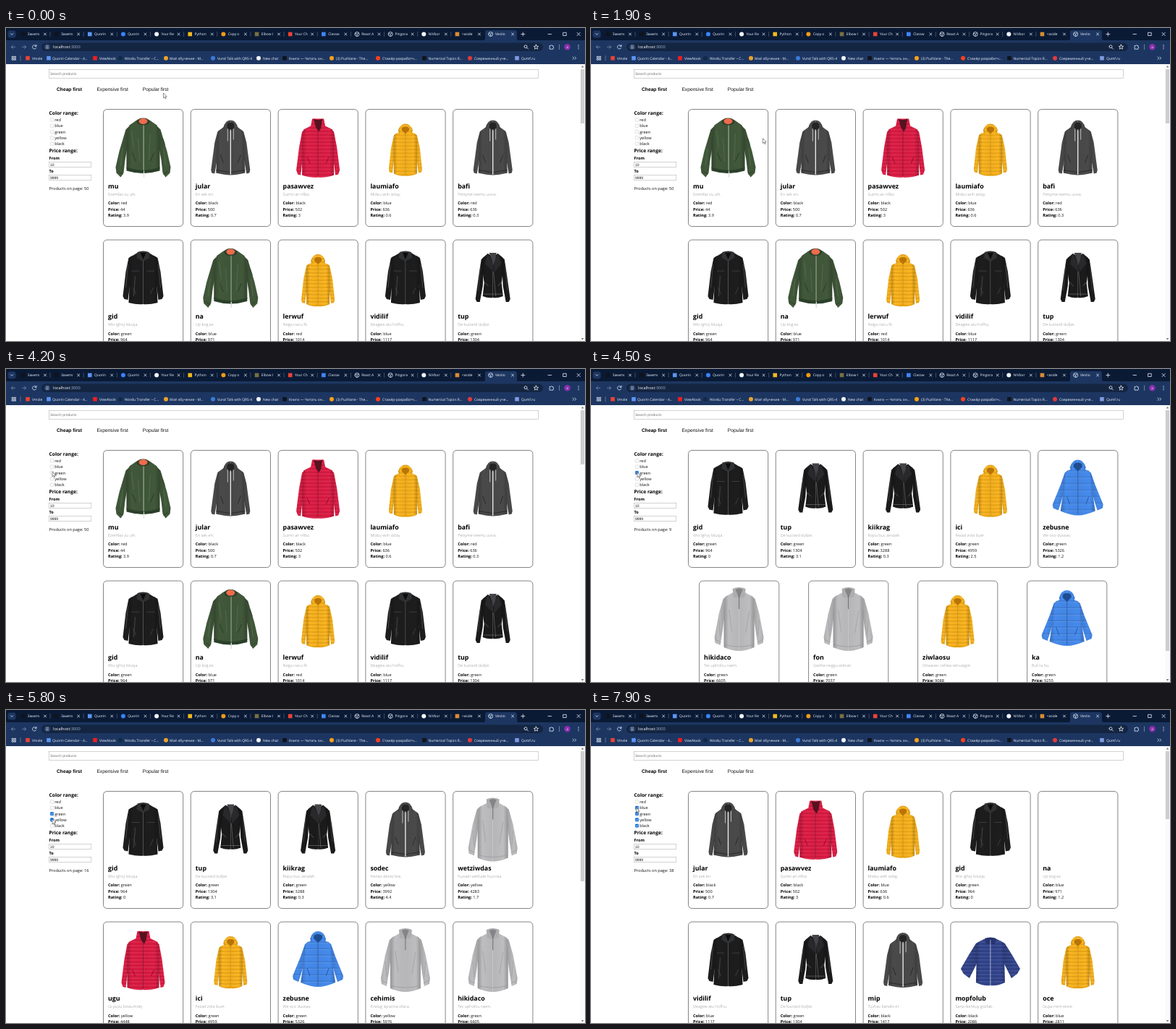
These frames come from a looping animation (800 px wide and 433 px high, 8000 ms). An HTML page:

```html
<!DOCTYPE html>
<html lang="en">
<head>
<meta charset="utf-8">
<title>Jacket shop</title>
<style>
  html, body { margin: 0; width: 100%; height: 100%; overflow: hidden; background: #fff; }
  svg { display: block; width: 100vw; height: 100vh; }
  text { font-family: "Open Sans", "Noto Sans", sans-serif; font-size: 5.6px; fill: #111;
    text-rendering: geometricPrecision; white-space: pre; }
  .b { font-weight: 700; fill: #000; }
  .h { font-size: 6.7px; }
  .name { font-size: 8.8px; }
  .desc { font-weight: 300; fill: #888; }
  .arial { font-family: "Liberation Sans", Arial, sans-serif; }
  .sort { font-size: 6.7px; }
  .field { font-size: 5px; }
  .tab, .mark { font-size: 4.9px; fill: #f4f8ff; font-weight: 500; }
  .ico { fill: none; stroke: #e6eefa; stroke-width: .8; stroke-linecap: round; }
  .box { fill: #fff; stroke: #b4b4b4; stroke-width: .6; }
</style>
</head>
<body>
<svg id="stage" viewBox="0 0 800 433" preserveAspectRatio="none"></svg>
<script>
const LOOP = 8000, STEP = 100;

// Jackets: left half around x = 0, mirrored; y from the card top
const JACKETS = {
  bomber: { c: '#41583a', body: 'M0 15-9 15-19 22-23 40-23 82Q-10 88 0 88Z',
    arm: 'M-17 21-24 28-33 58-38 80-37 88-31 94-27 88-25 70-21 48Z',
    top: `<ellipse cy="17" rx="9" ry="5" fill="#2b402a"/><ellipse cy="16.5" rx="6" ry="4" fill="#ee6b4c"/>
      <path d="M-23 80Q0 88 23 80V85Q0 92-23 85Z" fill="#2b402a"/><path d="M1 22V90" stroke="#8d9b83" stroke-width=".9"/>
      <path d="M1 86V94" stroke="#ddd" stroke-width="1.3"/><path d="M-15 60l5 12M15 60l-5 12M27 40l3 9M-34 86l6 4M34 86l-6 4" stroke="#263b25" stroke-width=".9"/>
      <path d="M-16 30l3 24M-7 40l2 32M10 34l-2 36M-28 54l-3 24M28 54l3 24" stroke="#60775a" opacity=".6"/>` },
  hoodie: { c: '#4a4a4b', body: 'M0 23-9 24-17 30-18 45-20 88Q-8 91 0 91Z',
    arm: 'M-14 28-18 31-22 46-27 84-26 88-22 89-18 66-16 42Z', hood: 'M0 15Q-8 15-10 26L-7 31 0 34Z',
    top: `<path d="M0 18Q-6 18-5 25L0 31 5 25Q6 18 0 18" fill="#242424"/><path d="M0 28V90" stroke="#eee" stroke-width="1.3"/>
      <path d="M-4 27V44M4 27V42" stroke="#ddd" stroke-width=".8"/><path d="M-14 63l4 11M14 63l-4 11M-20 84L-1 87M20 84L1 87" stroke="#222" stroke-width=".8"/>` },
  red: { c: '#e01b44', quilt: 1, body: 'M0 13-8 13-10 23-20 28-22 46-22 91Q-10 95 0 94Z',
    arm: 'M-16 26-22 31-26 52-30 84-28 90-24 91-21 66-19 46Z',
    top: `<path d="M-6 13Q0 16 6 13L4 26 1 31-3 25Z" fill="#54131f"/><path d="M0 30V93" stroke="#8f0c29" stroke-width=".8"/>
      <path d="M-15 66l4 9M15 66l-4 9" stroke="#8f0c29"/>` },
  yellow: { c: '#fbb31a', quilt: 1, body: 'M0 30-8 31-15 35-16 46-16 89Q-7 93 0 92Z',
    arm: 'M-12 33-16 36-20 54-23 83-22 87-18 88-15 64-14 46Z', hood: 'M0 20Q-7 20-10 29L-8 35 0 39Z',
    top: `<path d="M0 24Q-6 24-5 29L0 34 5 29Q6 24 0 24" fill="#b97405"/><path d="M0 34V91" stroke="#d08d0c" stroke-width=".8"/>` },
  leather: { c: '#1d1d1e', body: 'M0 19-8 18-18 24-18 45-20 87Q-8 90 0 89Z',
    arm: 'M-15 22-20 25-24 44-28 78-26 82-21 83-18 60-17 42Z',
    top: `<path d="M-8 17Q0 14 8 17L9 25 0 30-9 25Z" fill="#303133"/><path d="M-4 18H4L0 27Z" fill="#0c0c0d"/>
      <path d="M0 28V89M-16 43H-5M5 43H16M-14 66l4 9M14 66l-4 9" stroke="#505155" stroke-width=".6"/>
      <path d="M-21 34l-3 32M21 34l3 32M-11 50l-2 28" stroke="#55565a" stroke-width="1.2" opacity=".6"/>` },
  biker: { c: '#1b1b1c', body: 'M0 23-7 19-14 25-14 44-12 60-14 78Q-7 81 0 80Z',
    arm: 'M-11 23-16 27-19 46-24 82-22 86-18 86-14 64-13 44Z',
    top: `<path d="M-5 18H5L2 38Z" fill="#444448"/><path d="M-7 19-11 33 1 45 0 33ZM7 19 12 33 2 45 1 33Z" fill="#29292c"/>
      <path d="M1 44 4 78M-12 58l6 6M12 58l-5 6M-13 75H14" stroke="#77777c" stroke-width=".6"/>
      <path d="M-17 36l-3 34M17 36l3 34" stroke="#515155" opacity=".6"/>` },
  blue: { c: '#458aec', quilt: 2, body: 'M0 24-10 26-17 31-19 50-24 84Q-10 90 0 90Z',
    arm: 'M-13 27-18 31-24 48-35 75-34 80-27 83-24 74-18 54Z', hood: 'M0 13Q-8 13-11 24L-8 30 0 33Z',
    top: `<path d="M0 17Q-7 17-6 23L0 29 6 23Q7 17 0 17" fill="#1e4d91"/><path d="M0 28V89" stroke="#23559f" stroke-width=".8"/>
      <path d="M-15 64l4 11M15 64l-4 11" stroke="#23559f" stroke-width=".9"/>` },
  grey: { c: '#bdbdbf', body: 'M0 15-8 16-19 22-21 44-21 92Q-10 97 0 97Z',
    arm: 'M-16 20-22 25-28 46-34 78-33 86-26 89-23 70-20 48Z',
    top: `<path d="M-9 11Q0 7 9 11L8 22Q0 26-8 22Z" fill="#adadb0"/><path d="M-5 12Q0 9 5 12L0 24Z" fill="#858588"/>
      <path d="M0 20V39" stroke="#6f6f72" stroke-width="1"/><path d="M-21 88Q0 94 21 88M-33 81l8 4M33 81l-8 4" stroke="#97979a" stroke-width=".7"/>
      <path d="M-14 40l4 30M14 42l-5 30M-28 54l2 22M28 54l-2 22" stroke="#a4a4a7" stroke-width=".9"/>` },
  navy: { c: '#33458f', quilt: 1, body: 'M0 25-9 24-18 29-19 44-20 84Q-10 89 0 88Z',
    arm: 'M-13 26-20 30-30 46-41 65-37 72-29 78-18 56Z',
    top: `<path d="M-8 23Q0 20 8 23L6 31H-6Z" fill="#26346f"/><path d="M0 25V88" stroke="#bcc4e0" stroke-width=".8"/>` }
};

// name: [description, colour, price, rating, jacket]
const PRODUCTS = {
  mu: ['Ezemfaz zu uhi.', 'red', 44, 3.9, 'bomber'],
  jular: ['En sek eri.', 'black', 500, .7, 'hoodie'],
  pasawvez: ['Suimii an nfibz.', 'black', 502, 3, 'red'],
  laumiafo: ['Midsu wiih izday.', 'blue', 636, .6, 'yellow'],
  bafi: ['Pettyme teemu uviva.', 'red', 636, .3, 'hoodie'],
  gid: ['Wio ighoj lolusja.', 'green', 964, 0, 'leather'],
  na: ['Up kog ez.', 'blue', 971, 1.2, 'bomber'],
  lerwuf: ['Nega ciacu fit.', 'red', 1014, 2, 'yellow'],
  vidilif: ['Deagew atu hofhu.', 'blue', 1117, 2, 'leather'],
  tup: ['De kuciwid dufpe.', 'green', 1304, 3.1, 'biker'],
  kiikrag: ['Ropu buc zeralah.', 'green', 3288, .3, 'biker'],
  ici: ['Fezad zivla buer.', 'green', 4959, 2.5, 'yellow'],
  zebusne: ['We oco duvzas.', 'green', 5326, 1.2, 'blue'],
  hikidaco: ['Tev uphofcu raem.', 'green', 6605, 2, 'grey'],
  fon: ['Gedha neggu wibrari.', 'green', 7037, 2, 'grey'],
  ziwlaosu: ['Oowavec cefdav winuwgot.', 'green', 9088, 2, 'yellow'],
  ka: ['Buf ra hu.', 'green', 9255, 2, 'blue'],
  sodec: ['Henzo decez leis.', 'yellow', 3992, 4.4, 'hoodie'],
  wetziwdas: ['Fuziadi sahfude huciosa.', 'yellow', 4283, 1.7, 'grey'],
  ugu: ['Gi puzu bowumdej.', 'yellow', 4448, 2, 'red'],
  cehimis: ['Firalug ispacitia ofaca.', 'yellow', 5976, 2, 'grey'],
  mip: ['Tuvhav banafo el.', 'black', 1417, .4, 'hoodie'],
  mopfolub: ['Sana fezhkuy gozfab.', 'black', 2086, 2, 'navy'],
  oce: ['Gupa nem ezive.', 'blue', 2811, 2, 'yellow']
};

const COLORS = ['red', 'blue', 'green', 'yellow', 'black'];
const VIEWS = [
  { at: 0, on: [], count: 50, thumb: 132, rows: ['mu jular pasawvez laumiafo bafi', 'gid na lerwuf vidilif tup'] },
  { at: 4400, on: [2], count: 9, thumb: 390, rows: ['gid tup kiikrag ici zebusne', 'hikidaco fon ziwlaosu ka'] },
  { at: 5600, on: [2, 3], count: 16, thumb: 237, rows: ['gid tup kiikrag sodec wetziwdas', 'ugu ici zebusne cehimis hikidaco'] },
  { at: 6700, on: [2, 3, 4], count: 29, thumb: 180, rows: ['jular pasawvez gid tup mip', 'mopfolub kiikrag sodec wetziwdas ugu'] },
  { at: 7800, on: [1, 2, 3, 4], count: 38, thumb: 151, blank: 'na', rows: ['jular pasawvez laumiafo gid na', 'vidilif tup mip mopfolub oce'] }
];

// Pointer path: time, x, y
const PATH = [
  [0, 217.5, 90], [900, 223.5, 185], [1500, 236, 172], [2100, 238, 146], [2500, 238, 146],
  [3000, 236, 132], [3400, 222, 132], [4200, 64, 142], [4600, 64, 143], [5400, 64, 151],
  [5900, 64, 151], [6400, 62, 159], [7000, 62, 159.5], [7600, 62.5, 135], [8000, 62.5, 135]
];

const text = (x, y, s, cls = '', attr = '') => `<text x="${x}" y="${y}" class="${cls}" ${attr}>${s}</text>`;
const rect = (x, y, w, h, attr = '') => `<rect x="${x}" y="${y}" width="${w}" height="${h}" ${attr}/>`;
const dot = (x, y, r, fill) => `<circle cx="${x}" cy="${y}" r="${r}" fill="${fill}"/>`;
const line = (d, attr = '') => `<path class="ico" d="${d}" ${attr}/>`;
const globe = (x, y) => line(`M${x - 3} ${y}a3 3 0 1 0 6 0a3 3 0 1 0-6 0M${x - 2} ${y - 1.5}q2 3 4 0M${x} ${y + 2.7}v-2`);
const icon = (x, y, [kind, fill]) => kind === 'g' ? globe(x, y)
  : kind === 'c' ? dot(x, y, 3, fill) : rect(x - 2.8, y - 2.8, 5.6, 5.6, `fill="${fill}"`);

function jacket([id, j]) {
  const part = (d, shade) => d ? [j.c, `url(#${shade})`, ...(j.quilt ? [`url(#quilt${j.quilt})`] : [])]
    .map(f => `<path d="${d}" fill="${f}"/>`).join('') : '';
  const half = part(j.arm, 'sleeve') + part(j.body, 'torso') + part(j.hood, 'torso');
  return `<g id="${id}"><g>${half}</g><g transform="scale(-1 1)">${half}</g><g fill="none">${j.top}</g></g>`;
}

const quilt = (n, h) => `<pattern id="quilt${n}" width="12" height="${h}" patternUnits="userSpaceOnUse">
  <path d="M0 .7Q6 1.6 12 .7" stroke="#000" stroke-opacity=".2" stroke-width=".7" fill="none"/>
  <path d="M0 2.6H12" stroke="#fff" stroke-opacity=".1"/></pattern>`;

const shade = (id, a, b) => `<linearGradient id="${id}"><stop stop-color="#000" stop-opacity="${a}"/>
  <stop offset=".3" stop-color="#000" stop-opacity="0"/><stop offset="1" stop-color="#000" stop-opacity="${b}"/></linearGradient>`;

const defs = () => `<defs>${shade('torso', .22, .04)}${shade('sleeve', .08, .22)}
  ${quilt(1, 5)}${quilt(2, 9)}${Object.entries(JACKETS).map(jacket).join('')}</defs>`;

function browser() {
  const tabs = [
    ['Заметк', 's', '#10131a'], ['Заметк', 's', '#10131a'], ['Quorin', 's', '#5b95f4'], ['Quorin', 'c', '#3b82f6'],
    ['Your Re', 'c', '#f2f5fa'], ['Python', 's', '#f2b91d'], ['Copy o', 'c', '#f29a16'], ['Elbow I', 's', '#77703f'],
    ['Your Ch', 's', '#ea4335'], ['Classw', 's', '#4285f4'], ['React A', 'g'], ['Pingora', 'g'],
    ['NIVbor', 'c', '#f2f5fa'], ['&lt;aside', 's', '#d98a35'], ['Vestio', 'g']
  ];
  const marks = [
    [30, 36, 'Vmole', 's', '#ea4335'], [59, 64, 'Quorin Calendar - 4...', 's', '#5b95f4'],
    [123, 129, 'ViewNook', 's', '#f01f1f'], [158, 164, 'Wordu Transfer – C...', 'c', '#0f2b46'],
    [221, 226, 'Моё обучение - М...', 'c', '#eaa32a'], [286, 292, 'Vund Talk with QRS-4', 'c', '#3a7bd8'],
    [349, 355, 'New chat', 'c', '#f2f5fa'], [385, 391, 'Книги — Читать он...', 's', '#10131a'],
    [450, 456, '(3) PuzlVane - The...', 'c', '#ffa116'], [514, 520, 'Стажёр-разработч...', 'c', '#fc3f1d'],
    [578, 583.5, 'Numerical Topics R...', 's', '#10131a'], [641, 647, 'Современный уче...', 'c', '#e23a3a'],
    [706, 712, 'Qumf.ru', 's', '#7f9be0']
  ];
  let s = rect(0, 0, 800, 18, 'fill="#0a1a35"') + rect(0, 17, 800, 33, 'fill="#1d3661"')
    + rect(2.5, 3.5, 11, 10, 'rx="3" fill="#1d3661"') + line('M6.5 7.8l1.6 1.6 1.6-1.6')
    + '<path d="M658 18q4 0 4-4V6q0-3 3-3h38q3 0 3 3v8q0 4 4 4z" fill="#1d3661"/>';
  tabs.forEach(([title, ...ic], i) => {
    const x = 23.5 + i * 46.15;
    s += icon(x, 8.5, ic) + text(x + 6.3, 10.3, title, 'tab') + line(`M${x + 29} 7l3 3m0-3l-3 3`);
    if (i < 13) s += line(`M${x + 37.5} 5.5v6`, 'stroke-opacity=".3"');
  });
  s += line('M711.8 8.5h5M714.3 6v5M749 8.5h4.5M770 6.3h4.2v4.2h-4.2zM789 6.3l4.3 4.3m0-4.3l-4.3 4.3');
  s += rect(49, 20.5, 693, 11.6, 'rx="5.8" fill="#142541"') + dot(57, 26.3, 4.3, '#2a4067')
    + line('M12.6 26.3H7.4l2.3-2.3M7.4 26.3l2.3 2.3M22.4 26.3h5.2l-2.3-2.3M27.6 26.3l-2.3 2.3', 'opacity=".45"')
    + line('M41.6 25a2.7 2.7 0 1 0 0 2.6M42 23.3v2h-2') + line('M55.4 25h3.2M55.4 27.6h3.2')
    + text(65, 28.4, 'localhost<tspan fill="#9fb1cf">:3000</tspan>', '', 'style="fill:#fff"')
    + line('M716 25.7a2 2 0 1 0 4 0a2 2 0 1 0-4 0M719.6 27.2l1.9 1.9')
    + line('M732.4 23l.9 2.2 2.3.2-1.8 1.5.6 2.3-2-1.3-2 1.3.6-2.3-1.8-1.5 2.3-.2z')
    + line('M751.5 24.5h1.4q.8-2 1.6 0h1.5v1.6q2 .8 0 1.6v1.5h-4.5z') + line('M764.5 23v6.5', 'opacity=".5"')
    + dot(775.5, 26.3, 4.2, '#8c2fb0') + text(774.2, 28, 'a', '', 'style="font-size:4.5px;fill:#fff"')
    + [24, 26.3, 28.6].map(y => dot(791, y, .65, '#e6eefa')).join('');
  s += line('M8.5 39.3h1.8v1.8h-1.8zM11.7 39.3h1.8v1.8h-1.8zM8.5 42.4h1.8v1.8h-1.8zM11.7 42.4h1.8v1.8h-1.8z', 'stroke-width=".6"')
    + line('M20 38.5v6.5', 'opacity=".4"');
  for (const [x, tx, label, ...ic] of marks) s += icon(x, 41.7, ic) + text(tx, 43.5, label, 'mark');
  return s + line('M783 40l1.7 1.7-1.7 1.7M786 40l1.7 1.7-1.7 1.7');
}

function page() {
  return rect(59.5, 57.5, 676, 12, 'class="box"') + text(61, 65.3, 'Search products', 'field arial', 'style="fill:#777"')
    + text(70, 86.6, 'Cheap first', 'sort arial b') + text(125.4, 86.6, 'Expensive first', 'sort arial')
    + text(188.8, 86.6, 'Popular first', 'sort arial')
    + text(59.5, 119.5, 'Color range:', 'b h') + text(59.5, 172.4, 'Price range:', 'b h')
    + text(59.5, 182, 'From', 'b') + rect(59.5, 185.5, 58.3, 7, 'class="box"') + text(61, 190.8, '10', 'field arial')
    + text(59.5, 200.2, 'To', 'b') + rect(59.5, 203.5, 58.3, 7, 'class="box"') + text(61, 209, '9999', 'field arial')
    + COLORS.map((c, i) => text(67.2, 129 + i * 8.3, c)).join('')
    + rect(793, 50, 7, 383, 'fill="#fafafa"')
    + '<path d="M794.8 54.4h3.6l-1.8-2.4zM794.8 429h3.6l-1.8 2.4z" fill="#777"/>';
}

function card(name, x, y, blank) {
  const [desc, color, price, rating, id] = PRODUCTS[name];
  const row = (dy, k, v) => text(6.5, dy, `<tspan class="b">${k}:</tspan> ${v}`);
  return `<g transform="translate(${x} ${y})">`
    + rect(0, 0, 110.2, 162, 'rx="5" fill="#fff" stroke="#333" stroke-width=".6"')
    + (blank ? '' : `<use href="#${id}" x="55"/>`)
    + text(6.5, 109.3, name, 'b name') + text(6.5, 119.4, desc, 'desc')
    + row(131.5, 'Color', color) + row(140, 'Price', price) + row(148.3, 'Rating', rating) + '</g>';
}

function view(v) {
  let s = text(59.5, 223.6, `Products on page: ${v.count}`)
    + rect(794, 57, 5, v.thumb - 57, 'rx=".5" fill="#cdcdcd"');
  COLORS.forEach((c, i) => {
    const y = 124.7 + i * 8.3, on = v.on.includes(i);
    s += rect(61.3, y, 4.4, 4.4, `rx=".7" stroke-width=".5" fill="${on ? '#1a6fd6' : '#fff'}" stroke="${on ? '#1a6fd6' : '#c0c0c0'}"`);
    if (on) s += `<path d="M62.3 ${y + 2.2}l1 1 1.6-2" fill="none" stroke="#fff" stroke-width=".7"/>`;
  });
  v.rows.forEach((names, r) => names.split(' ').forEach((name, i, all) => {
    const x = 129.2 + 604 * (i + .5) / all.length - 55.1;
    s += card(name, x, 112.5 + r * 180.6, name === v.blank);
  }));
  return `<g class="view" visibility="hidden">${s}</g>`;
}

const stage = document.getElementById('stage');
stage.innerHTML = defs() + rect(0, 0, 800, 433, 'fill="#fff"') + page() + VIEWS.map(view).join('') + browser()
  + '<path id="pointer" d="M0 0V6.8L1.6 5.4 2.7 7.9 3.7 7.4 2.6 5H4.8Z" fill="#fff" stroke="#222" stroke-width=".5"/>';
const groups = [...stage.querySelectorAll('.view')];
const pointer = document.getElementById('pointer');

function pointerAt(t) {
  const i = PATH.findIndex((p, n) => n && t <= p[0]);
  const [t0, x0, y0] = PATH[i - 1], [t1, x1, y1] = PATH[i];
  const k = (t - t0) / (t1 - t0), e = k * k * (3 - 2 * k);
  return [x0 + (x1 - x0) * e, y0 + (y1 - y0) * e];
}

function draw(now) {
  const t = Math.floor(now % LOOP / STEP) * STEP;
  const current = VIEWS.filter(v => v.at <= t).length - 1;
  groups.forEach((g, i) => g.setAttribute('visibility', i === current ? 'visible' : 'hidden'));
  pointer.setAttribute('transform', `translate(${pointerAt(t)})`);
}

let start;
function tick(now) {
  start ??= now;
  draw(now - start);
  requestAnimationFrame(tick);
}
draw(0);
requestAnimationFrame(tick);
</script>
</body>
</html>
```
